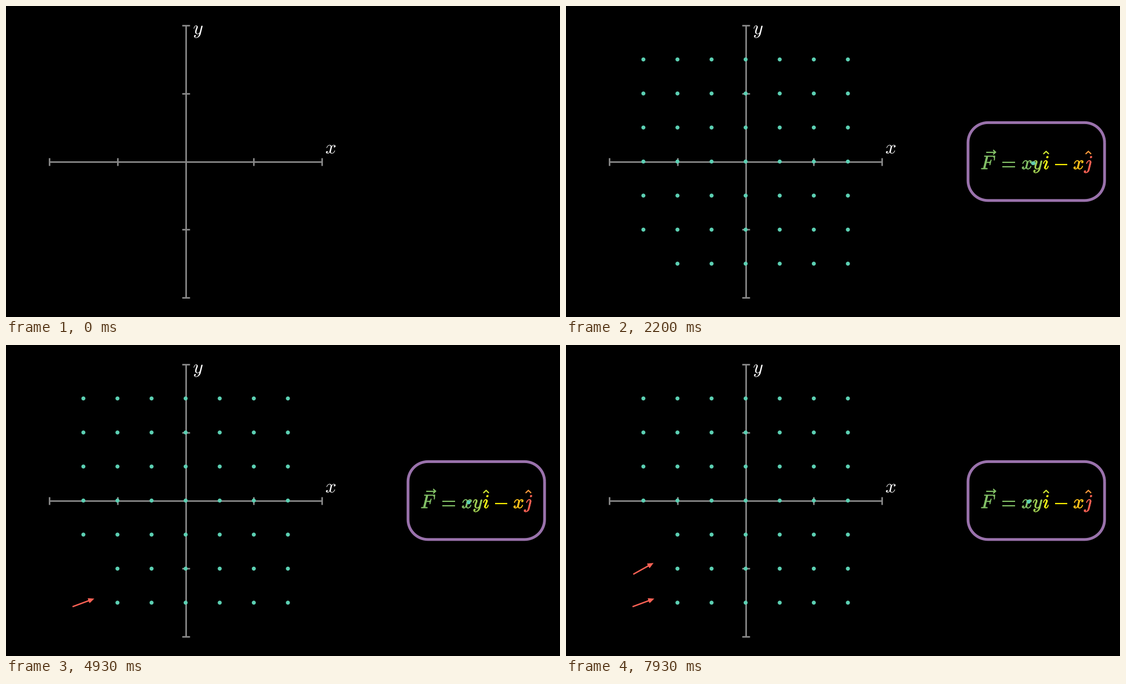
A matplotlib script for the animation above (8 s loop, 998x561 px).

```python
import numpy as np
import matplotlib.pyplot as plt
from matplotlib.animation import FuncAnimation
from matplotlib.collections import PolyCollection
from matplotlib.colors import to_rgb
from matplotlib.patches import PathPatch
from matplotlib.path import Path
from matplotlib.textpath import TextPath

plt.rcParams["mathtext.fontset"] = "cm"

W, H, DPI = 998, 561, 64
FRAMES, LOOP = 120, 8000
BEAT = 15                      # frames in one animation step
GREY, PURPLE = "#888888", "#9A72AC"
TEAL, RED = np.array(to_rgb("#5CD0B3")), np.array(to_rgb("#FC6255"))
ORIGIN = np.array([323.6, 280.6])
UNIT = 122.8
EM = 34.9
FORMULA_X, BASELINE = 746.7, 294.3
MID = np.array([846.5, 281.5])
REST = np.array([734, 333])
SAMPLES = 84


def px(width):
    return width * 72 / DPI


def sigmoid(t):
    return 1 / (1 + np.exp(-t))


def smooth(t):
    t = np.clip(t, 0, 1)
    low = sigmoid(-5)
    return float(np.clip((sigmoid(10 * (t - 0.5)) - low) / (1 - 2 * low), 0, 1))


def along(pts, fractions):
    """Points at the given fractions of a polyline's length."""
    steps = np.hypot(*np.diff(pts, axis=0).T)
    dist = np.concatenate([[0], np.cumsum(steps)])
    s = np.asarray(fractions) * dist[-1]
    return np.column_stack([np.interp(s, dist, pts[:, k]) for k in (0, 1)])


def trim(pts, a):
    steps = np.hypot(*np.diff(pts, axis=0).T)
    dist = np.concatenate([[0], np.cumsum(steps)])
    return np.vstack([pts[dist < a * dist[-1]], along(pts, [a])])


def rounded_box(cx, cy, w, h, r):
    """Closed outline from the top right corner, counterclockwise on screen."""
    pts = []
    for k, (sx, sy) in enumerate([(1, -1), (-1, -1), (-1, 1), (1, 1)]):
        ang = np.linspace(k, k + 1, 16) * np.pi / 2
        x = cx + sx * (w / 2 - r) + r * np.cos(ang)
        y = cy + sy * (h / 2 - r) - r * np.sin(ang)
        pts.append(np.column_stack([x, y]))
    pts = np.vstack(pts)
    return np.vstack([pts, pts[:1]])


def letter(char, x, y):
    path = TextPath((0, 0), f"${char}$", size=EM)
    return [p * [1, -1] + [x, y] for p in path.to_polygons()]


def compound(polys):
    return Path.make_compound_path(*[Path(p) for p in polys])


fig = plt.figure(figsize=(W / DPI, H / DPI), dpi=DPI, facecolor="black")
ax = fig.add_axes([0, 0, 1, 1])
ax.set_xlim(0, W)
ax.set_ylim(H, 0)
ax.axis("off")


def stroke(pts, color, width, z):
    pts = np.array(pts, float)
    line, = ax.plot(*pts.T, color=color, lw=px(width), zorder=z,
                    scalex=False, scaley=False,
                    solid_capstyle="butt", solid_joinstyle="miter")
    return line, pts


# Axes with ticks and labels
ox, oy = ORIGIN
stroke([(ox - 2 * UNIT, oy), (ox + 2 * UNIT, oy)], GREY, 2.8, 1)
stroke([(ox, oy - 2 * UNIT), (ox, oy + 2 * UNIT)], GREY, 2.8, 1)
for n in (-2, -1, 1, 2):
    x, y = ox + n * UNIT, oy + n * UNIT
    stroke([(x, oy - 7), (x, oy + 7)], GREY, 2.8, 1)
    stroke([(ox - 7, y), (ox + 7, y)], GREY, 2.8, 1)
for char, x, y in [("x", 575.3, 266.2), ("y", 337, 50.8)]:
    ax.add_patch(PathPatch(compound(letter(char, x, y)), fc="white", lw=0))

# Frame around the formula
box_line, box_pts = stroke(rounded_box(847.2, 280.6, 246, 140.5, 36), PURPLE, 5, 2)


class Letter:
    def __init__(self, char, offset, color):
        self.polys = letter(char, FORMULA_X + offset * EM, BASELINE)
        self.full = compound(self.polys)
        self.rgb = to_rgb(color)
        self.patch = ax.add_patch(
            PathPatch(self.full, ec=color, lw=px(0.8), zorder=3))

    def write(self, a):
        self.patch.set_visible(a > 0)
        if a < 0.5:
            part = [p[:max(2, int(2 * a * len(p)))] for p in self.polys]
            self.patch.set_path(compound(part))
            self.patch.set_facecolor((*self.rgb, 0))
        else:
            self.patch.set_path(self.full)
            self.patch.set_facecolor((*self.rgb, 2 * a - 1))


class Strokes:
    def __init__(self, color, *lines):
        self.parts = [stroke(pts, color, 2.2, 3) for pts in lines]

    def write(self, a):
        for line, pts in self.parts:
            line.set_visible(a > 0)
            line.set_data(*trim(pts, a).T)


def bar(x0, x1, y):
    return [(x0, y), (x1, y)]


def hat(x):
    return [(x - 5, 267), (x, 262.3), (x + 5, 267)]


glyphs = [
    Strokes("#83C167", bar(757.5, 774, 263.7),
            [(769.5, 259.7), (773.8, 263.7), (769.5, 267.7)]),
    Letter("F", 0, "#83C167"),
    Strokes("#83C167", bar(785.7, 809, 281.6), bar(785.7, 809, 289.7)),
    Letter("x", 2.116, "#83C167"),
    Letter("y", 2.688, "#A0CF52"),
    Strokes("#D0E835", hat(864.9)),
    Letter("i", 3.214, "#F8F814"),
    Strokes("#FFF200", bar(881, 903.3, 285.6)),
    Letter("x", 4.781, "#FFC21A"),
    Strokes("#FD9A3A", hat(941)),
    Letter("j", 5.353, "#FC6255"),
]

# Grid points: columns left to right, each from bottom to top
steps = np.arange(-3, 4) / 2
grid = [(x, y) for x in steps for y in steps]
homes = [ORIGIN + UNIT * np.array([x, -y]) for x, y in grid]


def disc(part=1.0):
    ang = 2 * np.pi * part * np.linspace(0, 1, SAMPLES)
    return 3.6 * np.column_stack([np.cos(ang), -np.sin(ang)])


def arrow(x, y):
    """Field arrow centred on zero, outline starting at its tip."""
    ang = np.arctan2(-x, 1.79 * x * y)
    half, neck, shaft, wing = 21, 10, 1.25, 4.9
    pts = np.array([(half, 0), (neck, -wing), (neck, -shaft), (-half, -shaft),
                    (-half, shaft), (neck, shaft), (neck, wing), (half, 0)])
    pts = along(pts, np.linspace(0, 1, SAMPLES))
    c, s = np.cos(ang), np.sin(ang)
    return pts @ np.array([[c, -s], [s, c]])


DISC = disc()
marks = PolyCollection([], edgecolors="none", zorder=4)
ax.add_collection(marks, autolim=False)


def travel(j, phase):
    """Outline and colour of point j: into the formula, to an arrow, back."""
    shape = arrow(*grid[j])
    step, rest = divmod(phase, BEAT)
    a = smooth(rest / BEAT)
    if step == 0:
        return DISC + homes[j] + a * (MID - homes[j]), TEAL
    if step == 1:
        return ((1 - a) * (DISC + MID) + a * (shape + REST),
                (1 - a) * TEAL + a * RED)
    if step == 2:
        return shape + REST + a * (homes[j] - REST), RED
    return shape + homes[j], RED


def update(i):
    drawn = smooth(i / BEAT) * len(grid)
    verts, colors = [], []
    for j, home in enumerate(homes):
        phase = i - BEAT - 3 * BEAT * j
        if phase >= 0:
            pts, color = travel(j, phase)
        else:
            pts, color = disc(np.clip(drawn - j, 0, 1)) + home, TEAL
        verts.append(pts)
        colors.append(color)
    marks.set_verts(verts)
    marks.set_facecolor(colors)

    a = np.clip((i - BEAT) / BEAT, 0, 1)
    box_line.set_visible(a > 0)
    box_line.set_data(*trim(box_pts, smooth(a)).T)
    lag = 0.2
    span = 1 + lag * (len(glyphs) - 1)
    for k, glyph in enumerate(glyphs):
        glyph.write(smooth(a * span - lag * k))
    return []


anim = FuncAnimation(fig, update, frames=FRAMES, interval=LOOP / FRAMES,
                     repeat=True, repeat_delay=0, init_func=lambda: update(0))
plt.show()
```
